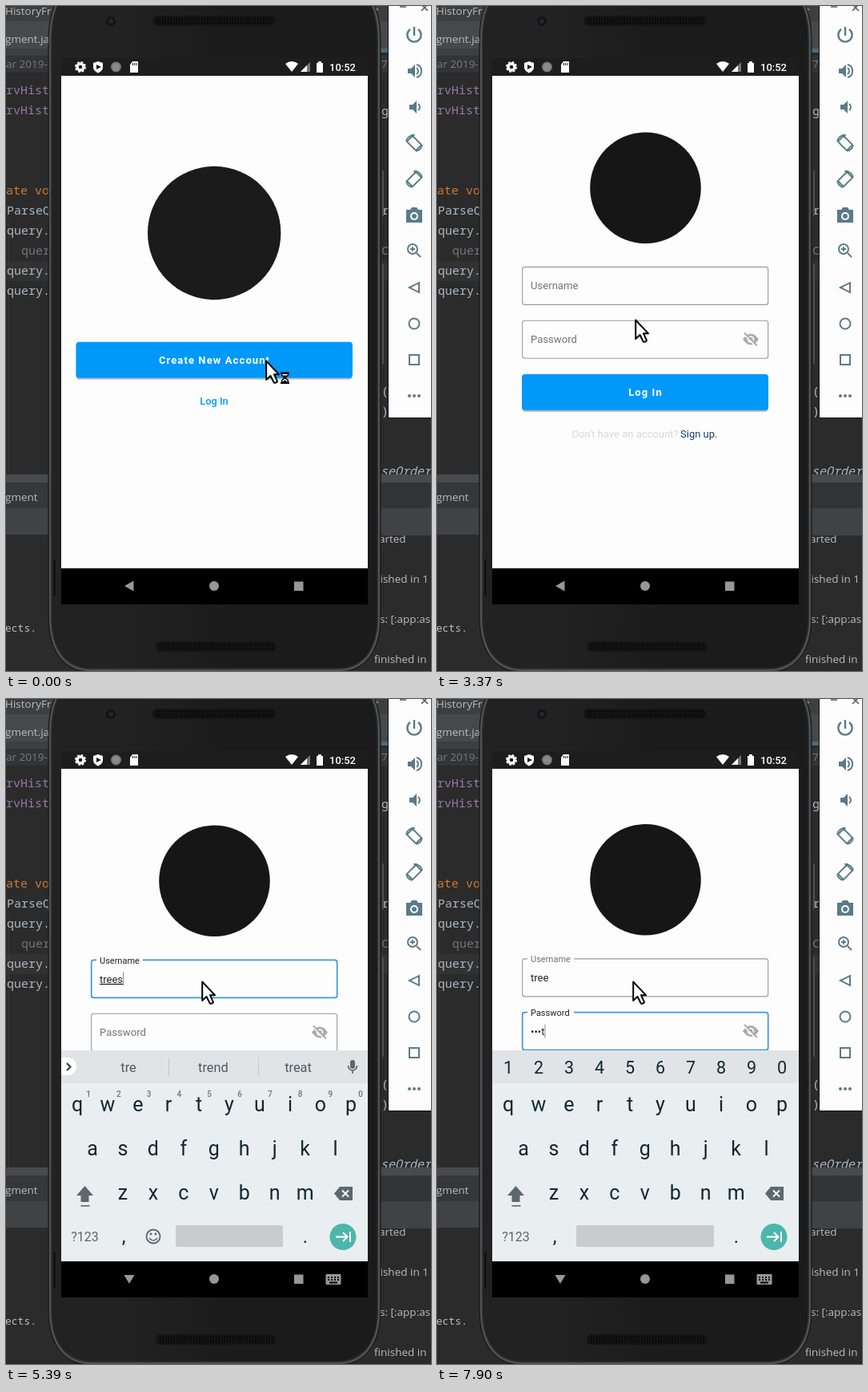
An HTML page for the animation above (8000 ms loop, 531 by 829 pixels).

```html
<!DOCTYPE html>
<html lang="en">
<head>
<meta charset="utf-8">
<title>Phone sign-in</title>
<style>
html, body { margin: 0; width: 100%; height: 100%; overflow: hidden; background: #2b2b2b; }
svg { display: block; width: 100%; height: 100%; }
text { white-space: pre; }
.ui { font-family: Roboto, sans-serif; }
.ide { font-family: "Open Sans", "Noto Sans", sans-serif; }
.mono { font-family: "Noto Sans Mono", "DejaVu Sans Mono", monospace; }
</style>
</head>
<body>
<svg id="stage" viewBox="0 0 531 829"></svg>
<script>
const LOOP = 8000;
const BLUE = '#0099fa', FOCUS = '#3f95e8', INK = '#1b1b1b';

const text = (x, y, str, size, fill, extra = '', cls = 'ui') =>
  `<text class="${cls}" x="${x}" y="${y}" font-size="${size}" fill="${fill}" ${extra}>${str}</text>`;
const rect = (x, y, w, h, fill, extra = '') =>
  `<rect x="${x}" y="${y}" width="${w}" height="${h}" fill="${fill}" ${extra}/>`;
const circle = (x, y, r, fill, extra = '') =>
  `<circle cx="${x}" cy="${y}" r="${r}" fill="${fill}" ${extra}/>`;
const path = (d, fill, extra = '') => `<path d="${d}" fill="${fill}" ${extra}/>`;
const line = (d, color, width = 2, extra = '') =>
  path(d, 'none', `stroke="${color}" stroke-width="${width}" ${extra}`);
const group = (id, body, extra = '') => `<g id="${id}" ${extra}>${body}</g>`;
const at = (x, y, body) => `<g transform="translate(${x} ${y})">${body}</g>`;
const MID = 'text-anchor="middle"';

function editor() {
  const code = (x, y, str, fill = '#a9b7c6', extra = '') => text(x, y, str, 15, fill, extra, 'mono');
  const label = (x, y, str, fill = '#bbbcbd') => text(x, y, str, 13.5, fill, '', 'ide');
  return rect(0, 0, 531, 829, '#2b2b2b') +
    rect(0, 0, 531, 19, '#3c3f41') + rect(0, 19, 531, 35, '#46494b') +
    rect(0, 53, 531, 5, '#4a6a7c') + rect(0, 53, 60, 9, '#3c3f41') +
    rect(0, 62, 531, 21, '#323436') +
    label(-1, 11, 'HistoryFra') + label(-1, 46, 'gment.ja') +
    label(0, 77, 'ar 2019-', '#77797b') + label(469, 77, '7', '#77797b') +
    path('M457 0L466 4L457 10Z', '#58a55c') +
    rect(0, 318, 478, 25, '#323232') + rect(3, 268, 1, 316, '#373737') +
    code(0, 110, 'rvHist', '#9876aa') + code(0, 135, 'rvHist', '#9876aa') +
    code(0, 235, 'ate vo', '#cc7832') + code(1, 260, 'ParseQ') +
    code(1, 285, 'query.') + code(19, 310, 'quer', '#72737a') +
    code(1, 335, 'query.') + code(1, 360, 'query.') +
    code(469, 136, 'g') + code(469, 260, 'r') + code(469, 310, 'C', '#72737a') +
    code(469, 485, '(') + code(469, 510, ')') +
    rect(470, 205, 2, 57, '#4c4e50') + rect(470, 322, 2, 124, '#4c4e50') +
    code(468, 585, 'seOrder', '#a9b7c6', 'font-style="italic"') +
    rect(0, 584, 531, 10, '#484a4c') + rect(0, 594, 60, 32, '#35383a') +
    rect(460, 594, 71, 32, '#313335') + rect(0, 626, 531, 33, '#3f4346') +
    label(-1, 617, 'gment') +
    text(-1, 780, 'ects.', 13, '#bbbcbd', '', 'mono') +
    label(466, 669, 'arted') + rect(460, 655, 71, 5, '#3f4346') +
    label(467.5, 719, 'ished in 1') + label(467, 769, 's: [:app:as') + label(460, 819, 'finished in');
}

function phone() {
  const shell = (i) => `M${62 + i} -4C${55 + i} 12 ${53 + i} 25 ${53 + i} 46V762C${53 + i} 806 ${74 + i} ${830 - i} ${104 + i} ${830 - i}` +
    `H${417 - i}C${447 - i} ${830 - i} ${468 - i} 806 ${468 - i} 762V46C${468 - i} 25 ${466 - i} 12 ${459 - i} -4Z`;
  const grille = (x, y, w) => rect(x, y, w, 13, '#141414', 'rx="6"') +
    [3, 6, 9].map(k => line(`M${x + 5} ${y + k + .5}H${x + w - 4}`, '#000', 1.6, 'stroke-dasharray="1.5 2"')).join('');
  return '<linearGradient id="sheen"><stop offset=".2" stop-color="#222"/><stop offset=".55" stop-color="#1b1b1b"/></linearGradient>' +
    path(shell(0), '#383838', 'stroke="#151515"') +
    line(shell(2), '#575757', 1.6) + path(shell(4), 'url(#sheen)', 'stroke="#2c2c2c"') +
    rect(59, 690, 3, 45, '#111') +
    circle(131, 19, 6, '#111315') + circle(131, 19, 3, '#23272b') +
    grille(183, 12, 154) + grille(187, 792, 151);
}

function toolbar() {
  const c = '#5b7b89', mid = 510;
  const speaker = path('M-8 -3H-4L1 -8V8L-4 3H-8Z', c);
  const rotate = `<rect x="-5" y="-8" width="10" height="16" rx="1" transform="rotate(-45)" fill="none" stroke="${c}" stroke-width="2"/>` +
    line('M-10 -2A10 10 0 0 1 -2 -10M10 2A10 10 0 0 1 2 10', c, 1.7) + path('M-4 -11H1L-1 -6Z', c);
  return rect(477, 0, 54, 514, '#111') + rect(478, 0, 53, 513, '#fdfdfd') +
    line('M492 1H500', '#555', 1.5) + line('M519 -2L527 6M527 -2L519 6', '#555', 1.5) +
    at(mid, 36, line('M0 -10V1M-5 -7A8.6 8.6 0 1 0 5 -7', c, 2.4)) +
    at(mid, 81, speaker + line('M3 -4A5 5 0 0 1 3 4M3 -8A8.3 8.3 0 0 1 3 8', c)) +
    at(mid + 2, 126, speaker + line('M3 -4A5 5 0 0 1 3 4', c)) +
    at(mid, 171, rotate) + at(mid, 216, `<g transform="scale(-1 1)">${rotate}</g>`) +
    at(mid, 261, path('M-10 -7H-5L-3 -10H3L5 -7H10V9H-10Z', c) + circle(0, 1, 5, '#fdfdfd') + circle(0, 1, 3, c)) +
    at(mid, 305, circle(-2, -2, 6, 'none', `stroke="${c}" stroke-width="2"`) +
      line('M3 3L8 8M-5 -2H1M-2 -5V1', c, 1.8)) +
    at(mid, 351, line('M-6 0L6 -6V6Z', c)) +
    circle(mid, 396, 6.5, 'none', `stroke="${c}" stroke-width="2"`) +
    rect(mid - 6, 435, 12, 12, 'none', `stroke="${c}" stroke-width="2"`) +
    [-6, 0, 6].map(d => circle(mid + d, 486, 2, c)).join('');
}

function statusBar() {
  const w = '#fff';
  return rect(69, 65, 383, 22, '#1d1d1d') +
    at(93, 76, circle(0, 0, 4, 'none', `stroke="${w}" stroke-width="3.4"`) +
      circle(0, 0, 6, 'none', `stroke="${w}" stroke-width="2" stroke-dasharray="2.6 2.1"`)) +
    at(115, 76, path('M0 -7L6 -5V0C6 4 3 6 0 7.5C-3 6 -6 4 -6 0V-5Z', w) + path('M-2 -3L4 0L-2 3Z', '#1d1d1d')) +
    circle(137.5, 76, 6.5, '#777') + circle(137.5, 76, 4.5, '#8b8b8b') +
    at(160, 76, path('M-2 -7H5V7H-5V-3Z', w) + line('M-1.5 -5V-2M.8 -5V-2M3 -5V-2', '#1d1d1d', 1)) +
    path('M357 82L349 72Q357 66 365 72Z', w) +
    path('M368 82H380V70Z', '#777') + path('M368 82H376V74Z', w) +
    path('M388 71H390V69H394V71H396V83H388Z', w) +
    text(404, 81, '10:52', 13, w, 'font-weight="500"');
}

function navBar() {
  const c = '#979797';
  const keys = [0, 1, 2, 3].map(k => rect(402 + k * 4, 720, 2, 2, '#000') + rect(402 + k * 4, 723, 2, 2, '#000')).join('');
  return rect(69, 701, 383, 45, '#000') +
    group('navBack', path('M148 723L159.500 716.500V729.500Z', c)) +
    group('navDown', path('M147.500 718H160.500L154 729Z', c) +
      rect(399.5, 717, 19, 13, c, 'rx="1"') + keys + rect(404, 726.5, 10, 2, '#000')) +
    circle(260, 723, 6, c) + rect(360, 717.5, 11.5, 11.5, c);
}

function button(x, y, w, label) {
  return rect(x + .5, y + 2, w - 1, 45, '#000', 'rx="4" opacity=".25"') + rect(x, y, w, 45, BLUE, 'rx="4"') +
    text(260.5, y + 27, label, 13, '#fff', `${MID} font-weight="700" letter-spacing="1.1"`);
}

function field(id, y, label) {
  return rect(106.7, y, 307, 47, 'none', `id="${id}Box" rx="3"`) +
    rect(113, y - 2, 58, 4, '#fdfdfd', `id="${id}Gap"`) +
    text(117, y, label, 11, '#222', `id="${id}Label"`) +
    text(117, y + 28.5, '', 13, '#222', `id="${id}Text"`) +
    rect(0, y + 15, 1, 17, '#888', `id="${id}Caret"`);
}

function pages() {
  const landing = circle(260.2, 283, 83.2, INK) + button(87.4, 418.8, 345.6, 'Create New Account') +
    text(260, 497, 'Log In', 12.8, BLUE, `${MID} font-weight="500"`);
  const eye = at(392, 415.5, path('M-10 0Q0 -14 10 0Q0 14 -10 0Z', '#aaa') + circle(0, 0, 4.3, '#fdfdfd') +
    circle(0, 0, 2.6, '#aaa') + line('M-9 -7L7 9', '#fdfdfd', 2) + line('M-8 -8L8 8', '#aaa', 1.8));
  const login = circle(260.5, 226.8, 69.3, '#161616') +
    field('user', 325.4, 'Username') + field('pass', 392.2, 'Password') + eye +
    button(106, 459, 308, 'Log In') +
    text(168.5, 537.5, 'Don\'t have an account?', 13, '#d9d9d9') +
    text(304, 537.5, 'Sign up.', 13, '#1c3f6b');
  return rect(69, 87, 383, 614, '#fdfdfd') + group('landing', landing) + group('login', login);
}

function keyboard() {
  const ink = '#10282f', grey = '#5b686e';
  const row = (str, x, y, size = 25, step = 37.95) =>
    [...str].map((ch, i) => text(x + i * step, y, ch, size, ink, MID)).join('');
  const digits = '1234567890';
  const hints = [...digits].map((d, i) => text(103 + i * 37.8, 496, d, 10, '#69757a', `${MID} font-weight="500"`)).join('');
  const words = [153, 259, 365].map((x, i) => text(x, 465, '', 16.4, '#4d5a60', `${MID} id="word${i}"`)).join('');
  const mic = at(433, 458, rect(-3, -8, 6, 11, grey, 'rx="3"') + line('M-5.500 -1A5.500 6 0 0 0 5.500 -1M0 5V9', grey, 1.6));
  const smile = circle(184, 670, 8.5, 'none', `stroke="${grey}" stroke-width="1.8"`) +
    circle(181, 667, 1.4, grey) + circle(187, 667, 1.4, grey) + line('M179 672Q184 678 189 672', grey, 1.6);
  return rect(69, 438, 383, 263, '#e9eef0') + rect(69, 438, 383, 41, '#e0e4e7') +
    group('wordRow', words + rect(203, 447, 1, 23, '#c4c9cc') + rect(315, 447, 1, 23, '#c4c9cc') +
      path('M69 447H77A11 11 0 0 1 77 469H69Z', '#fff') + line('M76 454L80.500 458.500L76 463', '#333', 2) + mic + hints + smile) +
    group('digitRow', row(digits, 89, 467, 21.5, 38)) +
    row('qwertyuiop', 89, 514, 25, 38) + row('asdfghjkl', 108, 568.5) + row('zxcvbnm', 146, 623.5) +
    path('M98.500 607L109 619H103.500V627H93.500V619H88Z', grey) + rect(93.5, 631, 11, 1.6, grey) +
    path('M410 616.500L417 608H433V625H417Z', grey) + line('M420 612.500L428 620.500M428 612.500L420 620.500', '#fff', 1.8) +
    text(98.5, 676, '?123', 16, grey, MID) + text(147, 678, ',', 24, ink, MID) + text(374, 678, '.', 24, ink, MID) +
    rect(212, 656, 134, 27, '#c8ccce', 'id="space" rx="2"') +
    circle(421, 670.5, 16.5, '#4db6ac') + line('M412 670.500H426M421 665L426.500 670.500L421 676M430 664V677', '#fff', 2);
}

const pointer = () =>
  path('M1.200 1.500V25L6.500 20L10.800 28.500Q13 29.500 15 27.200L11 18.200H17Z', '#fff',
    'stroke="#000" stroke-width="2" stroke-linejoin="round"') +
  group('busy', path('M20.500 17V19L24 22.500L20.500 26V28H28.500V26L25 22.500L28.500 19V17Z', '#fff', 'stroke="#000" stroke-width="1.5"') +
    line('M19 16.500H30M19 29H30', '#000', 2) + path('M22 19.500H27L24.500 22ZM21.500 28L24.500 25L27.500 28Z', '#000'));

document.getElementById('stage').innerHTML = editor() + phone() + toolbar() + statusBar() + pages() + navBar() +
  group('keyboard', keyboard()) + group('pointer', pointer());

// Each entry changes part of the state from its time on.
const timeline = [
  [0, { page: 'landing', mouse: [324, 441], busy: true, focus: '', user: '', pass: '', caret: false, keys: false, nav: false, words: [] }],
  [430, { busy: false }],
  [1680, { mouse: [315, 449] }],
  [1830, { mouse: [272, 480] }],
  [1950, { mouse: [261, 488] }],
  [2670, { page: '' }],
  [2820, { page: 'login' }],
  [3100, { mouse: [261, 478] }],
  [3250, { mouse: [256, 440] }],
  [3370, { mouse: [247, 390] }],
  [3490, { mouse: [244, 364] }],
  [3640, { mouse: [244, 351] }],
  [4040, { focus: 'user' }],
  [4570, { nav: true, caret: true }],
  [4690, { caret: false }],
  [4970, { keys: true, rising: true, user: 't', caret: true, words: ['t', 'thanks', 'thank'] }],
  [5120, { rising: false, user: 'tr', words: ['tr', 'try', 'true'] }],
  [5240, { user: 'tre', words: ['tre', 'trend', 'treat'] }],
  [5390, { user: 'trees' }],
  [5680, { user: 'tree', words: ['trees', 'trend', 'tree'] }],
  [5800, { user: 'tre', words: ['tre', 'trend', 'treat'] }],
  [6350, { user: 'tree' }],
  [6480, { words: ['tree', 'treetop', 'trees'] }],
  [6630, { focus: 'pass', caret: false }],
  [6750, { caret: true }],
  [7060, { caret: false }],
  [7490, { pass: 't', caret: false }],
  [7780, { pass: '••s', caret: true }],
  [7900, { pass: '•••t' }]
];

const el = id => document.getElementById(id);
const set = (id, attrs) => Object.entries(attrs).forEach(([k, v]) => el(id).setAttribute(k, v));
const show = (id, on) => set(id, { display: on ? 'inline' : 'none' });

function drawField(id, y, s) {
  const active = s.focus === id, raised = active || s[id] !== '';
  set(id + 'Box', { stroke: active ? FOCUS : '#9a9a9a', 'stroke-width': active ? 1.7 : 1.1 });
  show(id + 'Gap', raised);
  set(id + 'Label', { y: raised ? y + 4.4 : y + 28, 'font-size': raised ? 11 : 13.1, fill: active ? '#222' : '#737373' });
  el(id + 'Text').textContent = s[id];
  set(id + 'Text', { 'text-decoration': active && id === 'user' ? 'underline' : 'none' });
  show(id + 'Caret', active && s.caret);
  if (active && s.caret) set(id + 'Caret', { x: 117 + (s[id] ? el(id + 'Text').getComputedTextLength() : 0) });
}

function render(t) {
  const s = Object.assign({}, ...timeline.filter(([start]) => start <= t).map(([, change]) => change));
  const secret = s.focus === 'pass';
  show('landing', s.page === 'landing');
  show('login', s.page === 'login');
  set('login', { transform: `translate(0 ${secret ? -1.5 : 0})` });
  drawField('user', 325.4, s);
  drawField('pass', 392.2, s);
  show('navBack', !s.nav);
  show('navDown', s.nav);
  show('keyboard', s.keys);
  set('keyboard', { opacity: s.rising ? .82 : 1, transform: `translate(0 ${s.rising ? 7 : 0})` });
  show('wordRow', !secret);
  show('digitRow', secret);
  set('space', secret ? { x: 174, width: 172 } : { x: 212, width: 134 });
  for (let i = 0; i < 3; i++) el('word' + i).textContent = s.words[i] || '';
  set('pointer', { transform: `translate(${s.mouse})` });
  show('busy', s.busy);
}

const began = performance.now();
function tick() {
  render((performance.now() - began) % LOOP);
  requestAnimationFrame(tick);
}
tick();
</script>
</body>
</html>
```
